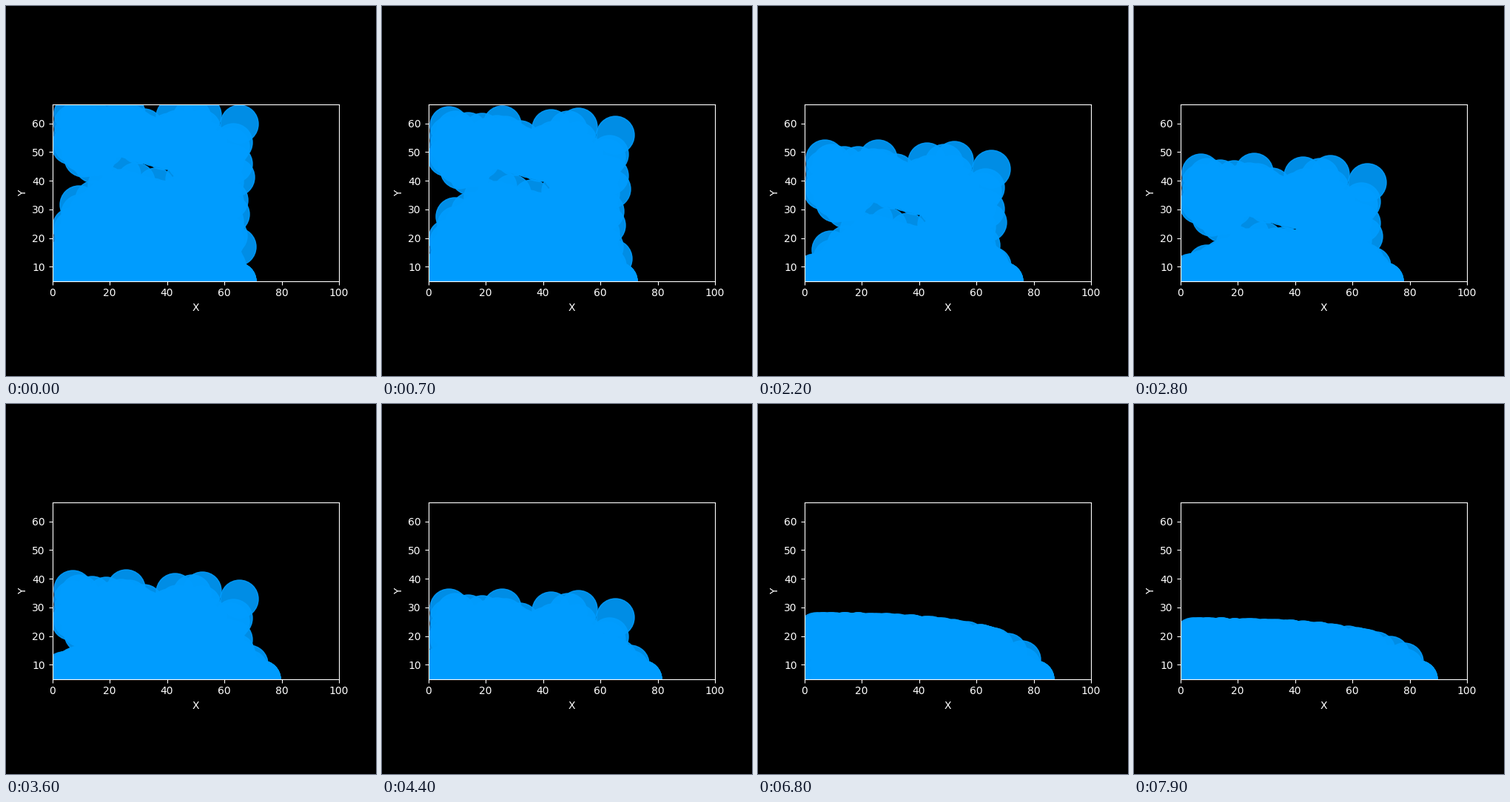
These frames come from a looping animation (500 by 500 pixels, 8 s). A matplotlib script:

```python
import numpy as np
import matplotlib.pyplot as plt
from matplotlib.animation import FuncAnimation

FRAMES, STEP = 80, 100
FLOOR = 5

# Starting outlines (x, y): top, right side, and both sides of the air gap
CREST = np.array([(7.2, 63.4), (9.5, 62), (13.8, 61.3), (18.6, 61.2),
                  (25.7, 63.6), (31.9, 58.5), (37.4, 55.6), (42.6, 62.5),
                  (48.6, 62), (52.3, 63)])
SIDE = np.array([(65.1, 60), (63, 53.4), (63.2, 46), (63.8, 41.3),
                 (61.6, 33.4), (62, 28.5), (61.4, 21), (64.4, 17.1)])
BELLY = np.array([(6.3, 52.4), (10.6, 48), (14.4, 46), (22, 55),
                  (30, 52.6), (38.6, 50.6), (46.5, 47)])
SHELF = np.array([(5, 14), (6.5, 24), (9.2, 31.7), (14.5, 33.5), (19, 38.5),
                  (24, 42), (29, 39.8), (36, 38), (44, 35), (48, 55),
                  (54, 54), (62, 52)])


def between(x, top, bottom, levels):
    """Fill the space between two curves over x."""
    x, v = np.meshgrid(x, levels)
    hi, lo = np.interp(x, *top.T), np.interp(x, *bottom.T)
    return np.column_stack([x.ravel(), (hi + v * (lo - hi)).ravel()])


ground = np.array([(0, FLOOR), (100, FLOOR)])
outline = np.vstack([CREST, SIDE, BELLY, SHELF])
inside = np.vstack([
    between(np.linspace(7, 52, 17), CREST, BELLY, (0.3, 0.6, 0.9)),
    between(np.linspace(7, 60, 20), SHELF, ground, np.linspace(0.12, 1, 7)),
])
falling = np.vstack([outline, inside])
rest_level = np.repeat([1, 0.7], [len(outline), len(inside)])
pile_u, pile_level = (g.ravel() for g in np.meshgrid(
    np.linspace(0.05, 1, 17), (1, 0.65, 0.3, 0)))


def fall(t):
    return 8.1 * t - 2.1 * (1 - np.exp(-2 * t))


def front(t):
    return 64.5 + 2.34 * t


def pile(x, t):
    """Height of the settled water, which fills its left end last."""
    late = np.clip((t - 4.2) / 1.3, 0, 1)
    swell = 0.13 * np.sin(np.pi * np.clip((t - 5.5) / 2.4, 0, 1))
    height = (13 + 1.8 * late) * (1 + swell)
    left = 1 - 0.8 * (1 - late) * np.exp(-(x / 18) ** 2)
    return height * left * np.sqrt(np.clip(1 - (x / front(t)) ** 3, 0, 1))


def particles(t):
    x, y = falling.T
    y = np.maximum(y - fall(t), FLOOR + rest_level * pile(x, t))
    px = pile_u * front(t)
    py = FLOOR + pile_level * pile(px, t)
    return np.column_stack([np.append(x, px), np.append(y, py)])


plt.style.use("dark_background")
fig, ax = plt.subplots(figsize=(5, 5), dpi=100)
ax.set(xlim=(0, 100), ylim=(FLOOR, 66.5), xlabel="X", ylabel="Y")
ax.set_aspect("equal")
water = ax.scatter(*particles(0).T, s=1350, color="#009dff", alpha=0.9)


def update(i):
    water.set_offsets(particles(i * STEP / 1000))
    return water,


anim = FuncAnimation(fig, update, frames=FRAMES, interval=STEP, repeat=True,
                     repeat_delay=0)
plt.show()
```
